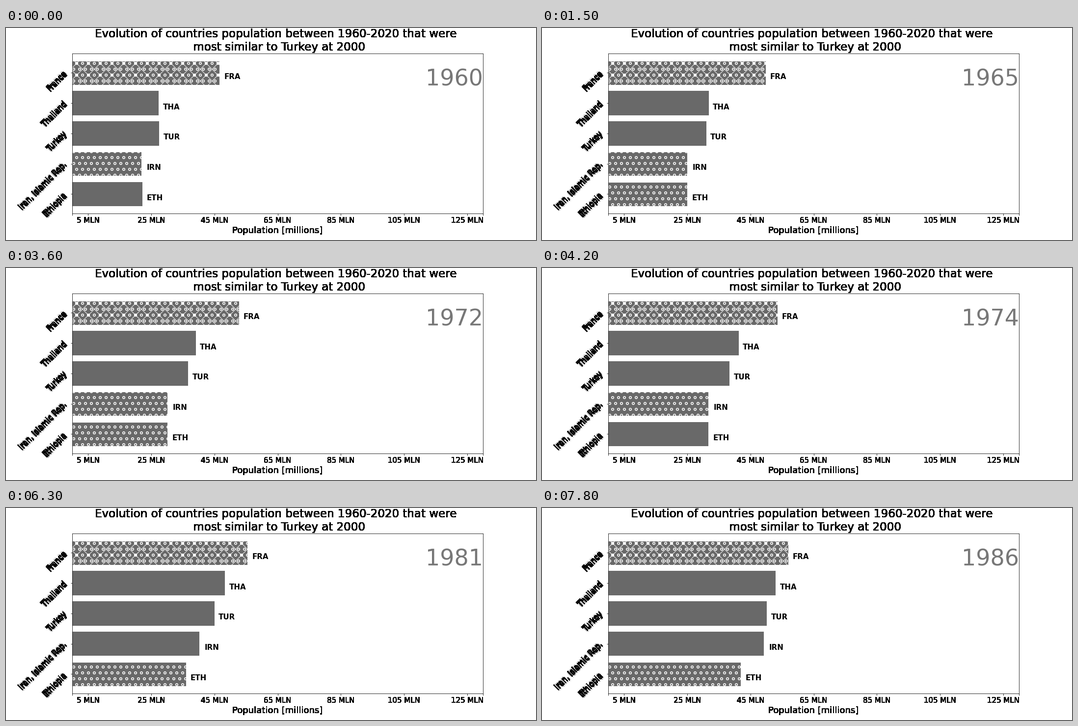
Animation of 1080x432 px, one loop 8000 ms. Source, as a matplotlib script:

```python
import numpy as np
import matplotlib.pyplot as plt
from matplotlib.animation import FuncAnimation

W, H, DPI = 1080, 432, 72
START = 1960
STEPS_PER_YEAR = 3
OVERDRAW = 60  # repeated drawing gives the heavy, rough-edged lettering

# population in millions at the key years, linear in between
KEYS = [1960, 1965, 1968, 1974, 1977, 1981, 1986]
COUNTRIES = [
    ("ETH", "Ethiopia", [22.15, 25.01, 26.94, 31.75, 33.55, 35.98, 41.97]),
    ("IRN", "Iran, Islamic Rep.", [21.91, 24.96, 27.03, 31.7, 34.84, 40.2, 49.28]),
    ("TUR", "Turkey", [27.47, 31.0, 33.2, 38.35, 41.1, 45.0, 50.13]),
    ("THA", "Thailand", [27.39, 31.82, 34.78, 41.3, 44.4, 48.3, 53.0]),
    ("FRA", "France", [46.62, 49.82, 51.22, 53.6, 54.5, 55.5, 57.0]),
]

plt.rcParams["font.family"] = "DejaVu Sans"
fig = plt.figure(figsize=(W / DPI, H / DPI), dpi=DPI, facecolor="white")


def label(x, y, s, size, **kw):
    """Text at pixel (x, y) from the top left."""
    fig.text(x / W, 1 - y / H, s, size=size, **kw)


def thicken():
    """Swap the drawn texts for one layer as if drawn OVERDRAW times."""
    fig.canvas.draw()
    light = np.asarray(fig.canvas.buffer_rgba())[..., 0] / 255
    layer = np.zeros((H, W, 4))
    layer[..., 3] = 1 - light ** OVERDRAW
    fig.clear()
    fig.figimage(layer, origin="upper", zorder=5)


label(553.5, 46, "Evolution of countries population between 1960-2020 that were \n"
      " most similar to Turkey at 2000", 23, ha="center", va="baseline")
label(553.5, 404, "Population [millions]", 18, ha="center", va="top")
for v in range(5, 130, 20):
    label(135 + 837 * v / 130, 385, f"{v} MLN", 15, ha="center", va="top")
for i, (_, name, _) in enumerate(COUNTRIES):
    for d in (0, 2):
        label(126 - d, 342 - d - 61.77 * i, name, 15, rotation=45,
              rotation_mode="anchor", ha="right", va="baseline")
thicken()

ax = fig.add_axes([0.125, 0.125, 0.775, 0.755])
ax.set(xlim=(0, 130), ylim=(-0.64, 4.64))
ax.set_xticks([0, *range(5, 130, 20), 130])
ax.set_yticks(range(5))
ax.tick_params(labelbottom=False, labelleft=False)

bars = ax.barh(range(5), [0] * 5, height=0.8, color="#696969")
tags = [ax.text(0, i - 0.2, code, size=15, weight="bold", ha="center")
        for i, (code, _, _) in enumerate(COUNTRIES)]
clock = ax.text(1, 0.8, "", transform=ax.transAxes, size=46,
                color="#777777", ha="right")


def update(n):
    year = START + n // STEPS_PER_YEAR
    pop = np.array([np.interp(year, KEYS, row) for _, _, row in COUNTRIES])
    rank = pop.round(1)
    for bar, tag, p, r in zip(bars, tags, pop, rank):
        hatch = "xo" if r == rank.max() else "o" if r == rank.min() else None
        bar.set_width(p)
        bar.set_hatch(hatch)
        bar.set_edgecolor("white" if hatch else "none")
        bar.set_linewidth(1 if hatch else 0)
        tag.set_x(p + 4)
    clock.set_text(str(year))
    return [*bars, *tags, clock]


anim = FuncAnimation(fig, update, frames=80, interval=100,
                     repeat=True, repeat_delay=0, blit=False)
plt.show()
```
